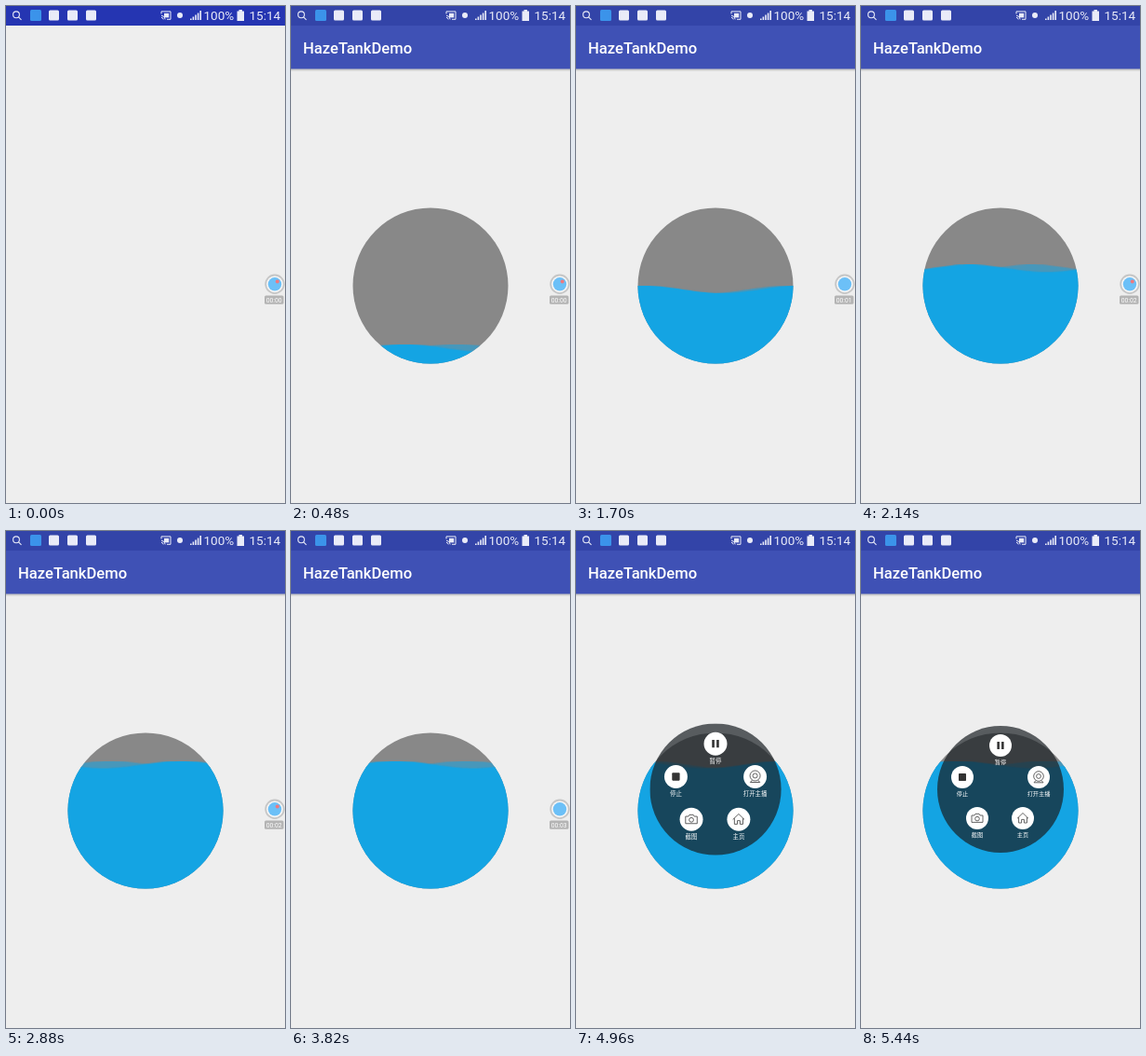
Write an HTML page that moves like this. It is 300 px wide and 533 px high and loops after 5.46 s.

```html
<!DOCTYPE html>
<html lang="en">
<head>
<meta charset="utf-8">
<title>Wave progress</title>
<style>
  html, body { margin: 0; width: 100%; height: 100%; overflow: hidden; background: #eee; }
  svg { display: block; width: 300px; height: 533px; font-family: Roboto, "Noto Sans", sans-serif; }

  .status, .app, .level, .front, .back, .rec, .blink, .menu {
    animation: 5460ms linear infinite;
  }
  .status { animation-name: tint; animation-timing-function: step-end; }
  .app { animation-name: open; animation-timing-function: step-end; }
  .rec { animation-name: leave; animation-timing-function: step-end; }
  .blink { animation-name: blink; animation-timing-function: step-end; }
  .level { animation-name: rise; }
  .front { animation-name: right; }
  .back { animation-name: left; }
  .menu { animation-name: pop; }

  @keyframes tint { 0% { fill: #2535b2; } 1.465%, 100% { fill: #3344a8; } }
  @keyframes open { 0% { opacity: 0; } 1.465%, 100% { opacity: 1; } }
  @keyframes leave { 0% { opacity: 1; } 84.25%, 100% { opacity: 0; } }
  @keyframes blink {
    0%, 37.18%, 73.81%, 100% { opacity: 1; }
    18.86%, 55.49% { opacity: 0; }
  }
  @keyframes rise {
    0%, 2.747% { transform: translate(150px, 383.5px); }
    50.183%, 100% { transform: translate(150px, 250.5px); }
  }
  @keyframes right {
    from { transform: translateX(-74.6px); }
    to { transform: translateX(455.5px); }
  }
  @keyframes left {
    from { transform: translateX(74.6px); }
    to { transform: translateX(-455.5px); }
  }
  @keyframes pop {
    0%, 86.81% { transform: scale(0); opacity: 0; animation-timing-function: cubic-bezier(.3, .6, .5, 1); }
    90.8% { transform: scale(1.04); opacity: 1; }
    92.3%, 100% { transform: scale(1); opacity: 1; }
  }

  .line { fill: none; stroke: #555; stroke-width: .9; stroke-linejoin: round; }
  .label { fill: #fff; font: 6.2px "Noto Sans CJK SC", "Noto Sans CJK", sans-serif; text-anchor: middle; }
</style>
</head>
<body>
<svg viewBox="0 0 300 533">
  <defs>
    <clipPath id="round"><circle cx="150" cy="300" r="83.5"/></clipPath>
    <linearGradient id="shade" x2="0" y2="1">
      <stop offset="0" stop-color="#000" stop-opacity=".2"/>
      <stop offset="1" stop-color="#000" stop-opacity="0"/>
    </linearGradient>
    <path id="wave"/>
  </defs>

  <rect width="300" height="533" fill="#eee"/>
  <rect class="status" width="300" height="21" fill="#3344a8"/>

  <g class="app">
    <rect y="21" width="300" height="46.5" fill="#3f51b5"/>
    <rect y="67.5" width="300" height="3" fill="url(#shade)"/>
    <text x="13" y="50.5" font-size="16.6" font-weight="500" fill="#fff">HazeTankDemo</text>
    <circle cx="150" cy="300" r="83.5" fill="#888"/>
    <g clip-path="url(#round)">
      <g class="level" fill="#14a4e3">
        <use class="back" href="#wave" fill-opacity=".55"/>
        <use class="front" href="#wave"/>
      </g>
    </g>
  </g>

  <!-- status icons -->
  <g fill="#e9ebf8">
    <g fill="none" stroke="#e9ebf8" stroke-width="1.1">
      <circle cx="11" cy="9.3" r="3.4"/>
      <path d="M13.5 11.8l3 3"/>
      <path d="M167 8.5v-2.6h10v8.4h-4M167 10.2q3.8.3 4.2 4.2M167 12.3q2 .2 2.2 2.1" stroke-width="1"/>
    </g>
    <rect x="170" y="7.8" width="5.2" height="4.6"/>
    <rect x="26" y="4" width="12" height="12" rx="1.5" fill="#3b93ea"/>
    <rect x="46" y="4.5" width="11" height="11" rx="1.5"/>
    <rect x="66" y="4.5" width="11" height="11" rx="1.5"/>
    <rect x="86" y="4.5" width="11" height="11" rx="1.5"/>
    <circle cx="187" cy="10" r="3"/>
    <path d="M198 15v-1.5h1.6v1.5zM200.6 15v-3.5h1.6v3.5zM203.2 15v-5.5h1.6v5.5zM205.8 15v-7.5h1.6v7.5zM208.4 15v-10h1.6v10z"/>
    <path d="M248.5 5.5h2v-1.5h3.5v1.5h2v10.5h-7.5z"/>
    <text x="212.5" y="14.8" font-size="13.5">100%</text>
    <text x="261.5" y="14.8" font-size="13.5">15:14</text>
  </g>

  <g class="rec">
    <circle cx="289" cy="298.3" r="9.8" fill="#f6f6f6" stroke="#c6c6c6" stroke-width="1.8"/>
    <circle cx="289" cy="298.3" r="7.2" fill="#6cc0f7"/>
    <circle class="blink" cx="291.8" cy="295.4" r="2" fill="#f0787c"/>
    <rect x="278" y="310.5" width="20.5" height="9.3" rx="1.5" fill="#b4b4b4"/>
    <text id="timer" x="288.2" y="317.6" font-size="6.8" fill="#fff" text-anchor="middle">00:00</text>
  </g>

  <g transform="translate(150 277)">
    <g class="menu">
      <circle r="68" fill="#191e23" fill-opacity=".7"/>
      <g id="buttons"></g>
    </g>
  </g>
</svg>
<script>
  const LOOP = 5460, LENGTH = 167, HEIGHT = 4;
  const $ = id => document.getElementById(id);

  // crest at x = 0, long enough for a whole loop of travel
  let outline = 'M-670 420';
  for (let x = -670; x <= 670; x += 4) {
    outline += `L${x} ${(-HEIGHT * Math.cos(2 * Math.PI * x / LENGTH)).toFixed(2)}`;
  }
  $('wave').setAttribute('d', outline + 'V420Z');

  const buttons = [
    [0, -47, '暂停', '<path d="M-3.6-4h2.5v8h-2.5zM1.1-4h2.5v8h-2.5z" fill="#333"/>'],
    [-41, -13, '停止', '<rect x="-4" y="-4" width="8" height="8" rx=".8" fill="#333"/>'],
    [41, -13, '打开主播', '<g class="line"><circle cy="-1" r="5.3"/><circle cy="-1" r="2.4"/><path d="M-3 3.5l-2 2.3h10l-2-2.3"/></g>'],
    [-25, 31, '截图', '<g class="line"><path d="M-6-3h3l1-1.7h4l1 1.7h3v7.4h-12z"/><circle cy=".6" r="2.3"/></g>'],
    [24, 31, '主页', '<path class="line" d="M-6 .3L0-5.5 6 .3M-4.4-1v6h3v-3.6h2.8v3.6h3v-6"/>']
  ];
  $('buttons').innerHTML = buttons.map(([x, y, name, icon]) =>
    `<g transform="translate(${x} ${y})"><circle r="12" fill="#fff"/>${icon}
     <text class="label" y="19.8">${name}</text></g>`).join('');

  let start;
  function tick(now) {
    start ??= now;
    const time = (now - start) % LOOP;
    $('timer').textContent = '00:0' + Math.max(0, Math.floor((time - 30) / 1000));
    requestAnimationFrame(tick);
  }
  requestAnimationFrame(tick);
</script>
</body>
</html>
```
